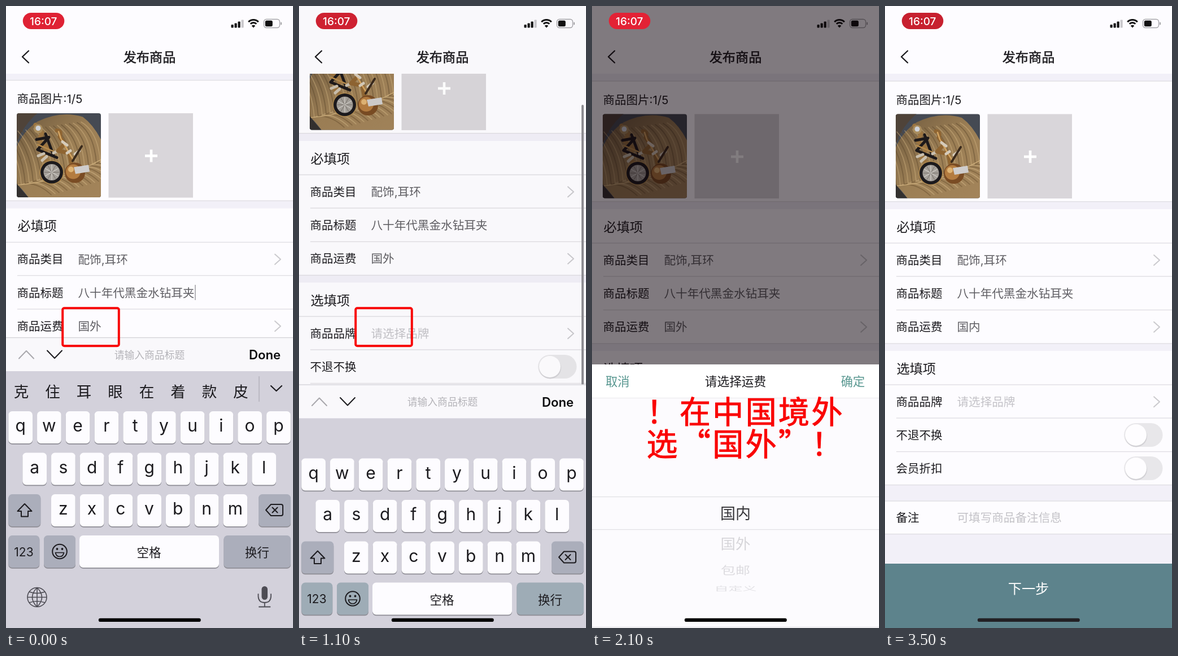
An HTML page that plays this animation: 508 px wide and 1102 px high, repeating every 3600 ms.

```html
<!DOCTYPE html>
<html lang="zh-CN">
<head>
<meta charset="utf-8">
<title>发布商品</title>
<style>
html, body { margin: 0; width: 100%; height: 100%; overflow: hidden; background: #fdfcff; }
svg { display: block; width: 100vw; height: 100vh; }
text { font-family: Inter, "Noto Sans CJK SC", "Noto Sans CJK", sans-serif; white-space: pre; }
.note { font-family: "Noto Sans CJK SC", "Noto Sans CJK", sans-serif; letter-spacing: 3.4px; stroke: #fa0303; stroke-width: 1; }
.medium { stroke: #1c1b1f; stroke-width: .5; }
</style>
</head>
<body>
<svg id="stage" viewBox="0 0 508 1102" preserveAspectRatio="none">
  <defs>
    <clipPath id="view"><rect y="120" width="508" height="982"/></clipPath>
    <clipPath id="thumb"><rect x="19" y="191.5" width="149" height="149" rx="4"/></clipPath>
    <linearGradient id="gold" x1="0" y1="0" x2="1" y2="1">
      <stop offset="0" stop-color="#6f5a3e"/><stop offset=".5" stop-color="#9c7f55"/><stop offset="1" stop-color="#a3845a"/>
    </linearGradient>
  </defs>
</svg>
<script>
const LOOP = 3600, STEP = 100;
const INK = '#1c1b1f', GREY = '#5f5e63', PALE = '#c3c2c7', RULE = '#dedde2', BAND = '#f2f0f8', PAPER = '#fdfcff';
const stage = document.getElementById('stage');

function el(parent, tag, attrs) {
  const e = document.createElementNS('http://www.w3.org/2000/svg', tag);
  for (const k in attrs) e.setAttribute(k, attrs[k]);
  parent.appendChild(e);
  return e;
}
const group = (p, attrs) => el(p, 'g', attrs);
const rect = (p, x, y, width, height, fill, rx = 0) => el(p, 'rect', { x, y, width, height, fill, rx });
const disc = (p, cx, cy, r, fill) => el(p, 'circle', { cx, cy, r, fill });
const line = (p, d, stroke, w = 2) => el(p, 'path', {
  d, stroke, fill: 'none', 'stroke-width': w, 'stroke-linecap': 'round', 'stroke-linejoin': 'round'
});
const shape = (p, d, fill) => el(p, 'path', { d, fill });
const rule = (p, y, x = 0, color = RULE) => rect(p, x, y - .6, 508 - x, 1.3, color);

// y is the middle of the line of text
function label(p, x, y, str, size, fill, anchor = 'start', weight = 400) {
  const t = el(p, 'text', { x, y: y + size * .375, 'font-size': size, fill, 'text-anchor': anchor, 'font-weight': weight });
  t.textContent = str;
  return t;
}

// ---- form ----
const app = group(stage);
rect(app, 0, 0, 508, 1102, BAND);
const view = group(app, { 'clip-path': 'url(#view)' });
const page = group(view);

function photo(p) {
  const g = group(p, { 'clip-path': 'url(#thumb)' });
  rect(g, 19, 191, 150, 150, '#454a53');
  shape(g, 'M19 250Q32 222 56 206Q98 186 136 198Q155 212 169 240V341H40Q24 320 19 318Z', 'url(#gold)');
  shape(g, 'M19 191H56Q31 212 19 244Z', '#4f4339');
  const veins = group(g, { opacity: .5 });
  for (let i = 0; i < 22; i++) {
    const x = 20 + i * 7;
    line(veins, `M${x} ${320 - i * 2}Q${x - 4} ${266 - i * 2} ${x - 34} ${228 - i}`, i % 2 ? '#cfb180' : '#5d482d', 1.6);
    line(veins, `M${x} ${320 - i * 2}Q${x + 30} ${308 - i * 2} ${x + 60} ${336 - i * 2}`, i % 2 ? '#d6b989' : '#69502f', 1.6);
  }
  line(g, 'M19 319Q98 312 168 274', '#c8a977', 1.5);
  shape(g, 'M19 316Q32 333 40 341H19Z', '#33302f');

  line(g, 'M52 212L64 226L58 240L74 252L64 270L80 282', '#9b7440', 7);
  line(g, 'M54 238L76 234L56 256L90 270M70 228L84 266', '#1d191a', 5);
  line(g, 'M56 247L84 259', '#b58a4c', 2.5);
  line(g, 'M57 267L67 263M64 275L72 268M84 262L92 258', '#c9bfae', 5);
  disc(g, 57, 219, 8, '#a98d5e');
  disc(g, 57, 218, 4.5, '#cfd3da');
  line(g, 'M90 222Q99 222 95 233L104 246L92 258L112 262L116 282', '#8f6532', 7);
  line(g, 'M93 224L97 236L106 252L118 272', '#d3a461', 2.5);
  line(g, 'M100 242L108 248M108 262L114 258M122 264L130 258', '#d5cbba', 5);
  line(g, 'M118 276L134 250', '#3a2a1c', 4);
  disc(g, 122, 297, 18, '#7a4c24');
  disc(g, 119, 295, 13, '#b47c40');
  disc(g, 115, 291, 5, '#dfb474');
  disc(g, 81, 296, 21.5, '#b08a50');
  disc(g, 81, 296, 20, '#1c1a1d');
  disc(g, 81, 296, 14.5, '#a5a09a');
  for (let i = 0; i < 12; i++) {
    const a = i * Math.PI / 6;
    line(g, `M81 296L${81 + 13 * Math.cos(a)} ${296 + 13 * Math.sin(a)}`, i % 2 ? '#dedbd6' : '#77716b', 1);
  }
  shape(g, 'M120 287L146 283L148 295L123 299Z', '#cfcdcc');
}

const arrow = (p, y) => line(p, `M476 ${y - 9}L486 ${y}L476 ${y + 9}`, '#cbcace', 2);

function row(y, name, value, color, more) {
  label(page, 19.5, y, name, 20.5, INK);
  if (more) arrow(page, y);
  return value && label(page, 127.5, y, value, 20.6, color);
}
function toggle(y) {
  rect(page, 423, y - 21, 68.5, 42, '#e8e7ea', 21);
  disc(page, 444.5, y + 2, 19.5, '#d3d2d6');
  disc(page, 444, y, 19, '#fefdff');
}

for (const [top, bottom] of [[133, 346.5], [360, 598], [611, 848.5], [877, 935.5]]) {
  rect(page, 0, top, 508, bottom - top, PAPER);
}
for (const y of [133, 346.5, 420, 598, 671, 848.5, 877, 935.5]) rule(page, y);
for (const y of [479, 538.5, 730, 789.5]) rule(page, y, 20);
label(page, 19.5, 166, '商品图片:1/5', 20.5, INK);
photo(page);
rect(page, 181.5, 191.5, 149.5, 149.5, '#d9d6da');
rect(page, 246, 264.7, 22, 4.6, '#fff');
rect(page, 254.7, 256, 4.6, 22, '#fff');
label(page, 20.5, 391, '必填项', 23.2, INK);
label(page, 20.5, 642, '选填项', 23.2, INK);
row(450.3, '商品类目', '配饰,耳环', GREY, true);
row(509.5, '商品标题', '八十年代黑金水钻耳夹', GREY);
const freight = row(568.7, '商品运费', '国外', GREY, true);
row(701.3, '商品品牌', '请选择品牌', PALE, true);
row(760.5, '不退不换');
row(819.7, '会员折扣');
row(906.3, '备注', '可填写商品备注信息', PALE);
toggle(760);
toggle(819);
const caret = rect(page, 334, 495.5, 2, 27, '#b4b3b8');

rect(app, 0, 988, 508, 114, '#5d838c');
label(app, 254, 1031.5, '下一步', 24.2, '#fff', 'middle');
const bar = rect(app, 500, 177, 4, 324, '#8f8e93', 2);

// ---- navigation and status ----
rect(app, 0, 0, 508, 120, PAPER);
line(app, 'M40 79.5L29 90L40 100.5', INK, 2.4);
label(app, 254, 90, '发布商品', 23.2, INK, 'middle').setAttribute('class', 'medium');
[5.5, 8, 11, 14].forEach((h, i) => rect(app, 398.5 + i * 6, 38.5 - h, 4.2, h, i < 3 ? '#111' : '#c9c8cc', 1));
for (const r of [7.3, 12.2]) {
  const d = r * .72;
  el(app, 'path', { d: `M${438 - d} ${37 - d}A${r} ${r} 0 0 1 ${438 + d} ${37 - d}`, fill: 'none', stroke: '#111', 'stroke-width': 3 });
}
shape(app, 'M438 38.5L434.7 35Q438 32.3 441.3 35Z', '#111');
el(app, 'rect', { x: 456.5, y: 23.5, width: 28, height: 15, rx: 4.5, fill: 'none', stroke: '#a5a4a8', 'stroke-width': 1.4 });
rect(app, 458.8, 25.8, 13, 10.4, '#111', 2.5);
rect(app, 486, 28.5, 2, 5, '#a5a4a8', 1);

const shade = rect(app, 0, 0, 508, 1102, '#0a0006');

// ---- picker sheet ----
const sheet = group(stage);
rect(sheet, 0, 635, 508, 470, '#fcfbfe');
rect(sheet, 0, 635, 508, 59, '#fff');
rule(sheet, 694.5, 0, '#ececf0');
label(sheet, 24, 665, '取消', 21.3, '#589790');
label(sheet, 254, 665, '请选择运费', 21.7, INK, 'middle');
label(sheet, 483, 665, '确定', 21.3, '#589790', 'end');
for (const y of [869.5, 927.5, 1100.5]) rule(sheet, y, 0, '#e2e1e5');
[['国内', 898.5, 27, 1, '#353438'], ['国外', 953, 26.5, .93, '#d6d5d9'],
 ['包邮', 1000, 26, .75, '#dddce0'], ['自定义', 1032, 25, .42, '#e1e0e4']].forEach(([s, y, size, k, c]) => {
  label(group(sheet, { transform: `translate(254 ${y}) scale(1 ${k})` }), 0, 0, s, size, c, 'middle');
});

// ---- keyboard ----
const board = group(stage);
rect(board, 0, 587, 508, 60, '#f9f8fb');
rule(board, 587.5, 0, '#d3d2d7');
line(board, 'M23 624.5L36 611L49 624.5', '#a9a8ad');
line(board, 'M73 610.5L86 624L99 610.5', INK);
label(board, 254, 618, '请输入商品标题', 17.8, '#b4b3b8', 'middle');
label(board, 458, 618, 'Done', 22.2, '#0d0d0f', 'middle', 600);
rect(board, 0, 647, 508, 455, '#d3d1db');
const words = group(board);
[...'克住耳眼在着款皮'].forEach((c, i) => label(words, 27 + i * 55.5, 683, c, 26.5, INK, 'middle'));
rect(words, 447.3, 656, 1.4, 45, '#b1b0b9');
line(words, 'M469 673L478.5 682L488 673', INK, 2.2);

function key(x, y, w, fill = '#fdfcff') {
  rect(board, x, y + 1.7, w, 57, '#8e8d95', 6.5);
  return rect(board, x, y, w, 57, fill, 6.5);
}
const FN = '#abaebb';
[['qwertyuiop', 4.3, 718], ['asdfghjkl', 29.3, 791.5], ['zxcvbnm', 80, 865]].forEach(([letters, x, y]) => {
  [...letters].forEach((c, i) => {
    key(x + i * 50.75, y, 42.7);
    el(board, 'text', { x: x + i * 50.75 + 21.3, y: y + 36, 'font-size': 30, fill: INK, 'text-anchor': 'middle' }).textContent = c;
  });
});
key(4.3, 865, 57, FN);
key(447, 865, 57, FN);
line(board, 'M33 882L20.5 895H27V904.5H39V895H45.5Z', INK);
line(board, 'M469 883H487Q490 883 490 886V900Q490 903 487 903H469L460 893Z', INK);
line(board, 'M471.5 888.5L480.5 897.5M480.5 888.5L471.5 897.5', INK);
const low = [key(4.3, 938, 55, FN), key(67, 938, 56, FN), key(385.5, 938, 118.5, FN)];
key(130, 938, 247);
label(board, 31.5, 967, '123', 21, INK, 'middle');
label(board, 253, 968, '空格', 21.5, INK, 'middle');
label(board, 444.5, 968, '换行', 21.5, INK, 'middle');
el(board, 'circle', { cx: 95, cy: 966.5, r: 12.8, fill: 'none', stroke: INK, 'stroke-width': 2 });
disc(board, 90.5, 962, 1.9, INK);
disc(board, 99.5, 962, 1.9, INK);
line(board, 'M87.5 968.5H102.5Q101 975.5 95 975.5Q89 975.5 87.5 968.5Z', INK, 1.7);
line(board, 'M38 1047.5A17 17 0 0 1 72 1047.5A17 17 0 0 1 38 1047.5H72M55 1030.5V1064.5M55 1030.5Q38 1047.5 55 1064.5Q72 1047.5 55 1030.5M41.5 1038Q55 1043 68.5 1038M41.5 1057Q55 1052 68.5 1057', '#4d4c54', 1.6);
rect(board, 452.5, 1028, 10.5, 24, '#4d4c54', 5.2);
line(board, 'M446.5 1042V1046Q447 1057 457.8 1057Q468.5 1057 469 1046V1042M457.8 1057V1064M448 1064.5H467.5', '#4d4c54', 1.8);

// ---- top layer ----
const pill = rect(stage, 29.8, 12, 73.5, 29, '#d22', 14.5);
label(stage, 66.3, 26.7, '16:07', 19, '#fff', 'middle', 500);
const home = rect(stage, 163.8, 1084.8, 181, 6.2, '#000', 3.1);
const frame = el(stage, 'rect', { x: 100.2, y: 535.2, width: 99.6, height: 67, rx: 3, fill: 'none', stroke: '#f80505', 'stroke-width': 4 });
const note = group(stage);
['！在中国境外', '选“国外”！'].forEach((s, i) => {
  label(note, 96.5, 718.5 + i * 57, s, 55, '#fa0303').setAttribute('class', 'note');
});

// ---- motion: [ms, value] ----
const TRACKS = {
  scroll: [[0, 1.5], [100, 25], [200, 100], [300, 140], [1000, 140], [1100, 121], [1200, 55], [1300, 14], [1400, 1], [1800, 1], [2000, 0]],
  board: [[1000, 0], [1100, 83.5], [1200, 320], [1300, 470], [1400, 520]],
  sheet: [[1080, 0], [1100, .03], [1200, .35], [1300, .78], [1400, 1], [2250, 1], [2400, .51], [2550, 0]],
  bar: [[0, 0], [100, 1], [1500, 1], [1800, 0]],
  glow: [[0, .6], [300, .5], [1100, .2], [1500, .1], [2400, 1], [2900, .4], [3500, .05]]
};
function at(track, t) {
  const i = track.findIndex(k => k[0] > t);
  if (i < 0) return track[track.length - 1][1];
  if (!i) return track[0][1];
  const [t0, a] = track[i - 1], [t1, b] = track[i];
  return a + (b - a) * (t - t0) / (t1 - t0);
}
const show = (e, on) => e.setAttribute('visibility', on ? 'visible' : 'hidden');
const shift = (e, y) => e.setAttribute('transform', `translate(0 ${y})`);

function draw(t) {
  const v = {};
  for (const k in TRACKS) v[k] = at(TRACKS[k], t);
  shift(page, -v.scroll);
  shift(board, v.board);
  show(board, v.board < 515);
  show(words, t < 1050);
  low.forEach(k => k.setAttribute('fill', t < 1050 ? FN : '#9eacb6'));
  shift(sheet, 467 * (1 - v.sheet));
  show(sheet, v.sheet > 0);
  shade.setAttribute('opacity', v.sheet * .515);
  const top = 163 + v.scroll * .1;
  bar.setAttribute('y', top);
  bar.setAttribute('height', Math.min(324 + v.board * 2.2, 975 - top));
  bar.setAttribute('opacity', v.bar);
  const mix = (a, b) => Math.round(a + (b - a) * v.glow);
  pill.setAttribute('fill', `rgb(${mix(197, 240)},${mix(32, 35)},${mix(47, 56)})`);
  freight.textContent = t < 2200 ? '国外' : '国内';
  freight.setAttribute('fill', t >= 300 && t < 1000 ? '#aaa9ae' : GREY);
  home.setAttribute('fill', t >= 2600 ? '#222024' : '#000');
  show(caret, t < 100);
  show(frame, t < 1900);
  show(note, t >= 1400 && t < 3200);
}
const start = performance.now();
function tick() {
  const t = (performance.now() - start) % LOOP;
  draw(Math.floor(t / STEP) * STEP);
  requestAnimationFrame(tick);
}
draw(0);
requestAnimationFrame(tick);
</script>
</body>
</html>
```
